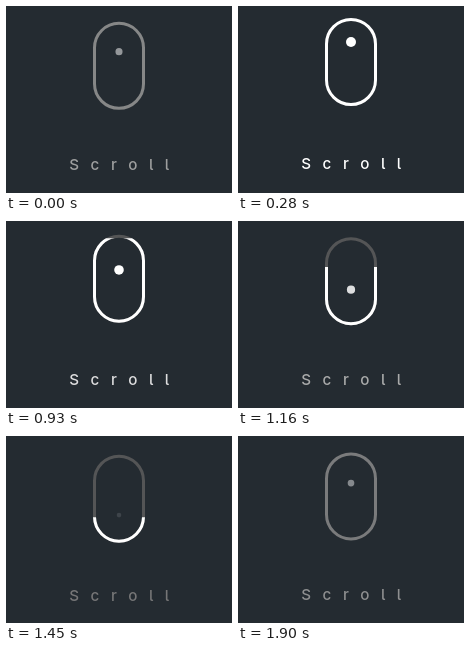
An HTML page for the animation above (2 s loop, 226x187 px).

```html
<!DOCTYPE html>
<html lang="en">
<head>
<meta charset="utf-8">
<title>Scroll hint</title>
<style>
  html, body { margin: 0; width: 100%; height: 100%; overflow: hidden; background: #242b31; }
  svg { display: block; width: 226px; height: 187px; }
  text { font: 500 15.2px Inter, Lato, sans-serif; letter-spacing: 11.6px; font-feature-settings: "cv05"; }
</style>
</head>
<body>
<svg viewBox="0 0 226 187">
  <defs>
    <clipPath id="fill"><rect id="level" x="80" width="66" height="120"/></clipPath>
    <rect id="pill" x="88.5" y="13.5" width="49" height="85" rx="24.5" fill="none" stroke-width="3"/>
  </defs>
  <g id="mouse">
    <use id="base" href="#pill"/>
    <g clip-path="url(#fill)"><use href="#pill" stroke="#fff"/></g>
    <circle id="ball" cx="113" r="5" fill="#fff"/>
  </g>
  <text id="label" x="63.2" y="163.2">Scroll</text>
</svg>
<script>
  const LOOP = 2000, START = 800, CYCLE = 1500;
  const $ = id => document.getElementById(id);
  const mouse = $('mouse'), base = $('base'), level = $('level'), ball = $('ball'), label = $('label');
  const GREY = [84, 85, 86], WHITE = [255, 255, 255];

  const linear = p => p;

  // cubic-bezier(0, 0, .58, 1)
  function easeOut(p) {
    let lo = 0, hi = 1;
    for (let i = 0; i < 24; i++) {
      const u = (lo + hi) / 2;
      if (1.74 * u * u * (1 - u) + u * u * u < p) lo = u; else hi = u;
    }
    return lo * lo * (3 - 2 * lo);
  }

  // Interpolates rows of [time, ...values], easing each segment.
  function track(keys, t, ease = linear) {
    if (t <= keys[0][0]) return keys[0].slice(1);
    for (let i = 1; i < keys.length; i++) {
      const a = keys[i - 1], b = keys[i];
      if (t < b[0]) {
        const p = ease((t - a[0]) / (b[0] - a[0]));
        return a.slice(1).map((v, k) => v + (b[k + 1] - v) * p);
      }
    }
    return keys[keys.length - 1].slice(1);
  }

  // Elapsed time to cycle time; the return lingers briefly midway.
  const PACE = [[0, 0], [1000, 1000], [1100, 1150], [1200, 1180], [1480, CYCLE]];
  const NUDGE = [[0, 0], [1000, 1], [1500, 0]];
  const BASE = [[1050, ...GREY], [1500, ...WHITE]];
  const TEXT = [[0, ...WHITE], [1050, ...GREY], [1500, ...WHITE]];
  // time, opacity, scale, offset
  const BALL = [
    [0, 1, 1, -20], [300, 1, .9, 5], [700, 0, .4, 40],
    [750, 0, .4, -20], [950, 0, .4, -20], [1400, 1, 1, -20]
  ];

  const rgb = c => `rgb(${c.map(Math.round)})`;

  function draw(ms) {
    const t = track(PACE, (ms - START + LOOP) % LOOP)[0];
    const nudge = track(NUDGE, t, easeOut)[0];
    const [alpha, scale, offset] = track(BALL, t);

    mouse.setAttribute('transform', `translate(0 ${8 * nudge})`);
    base.setAttribute('stroke', rgb(track(BASE, t)));
    level.setAttribute('y', .8 + .1135 * t);
    ball.setAttribute('cy', 56 + scale * offset);
    ball.setAttribute('r', 5 * scale);
    ball.setAttribute('opacity', alpha);
    label.setAttribute('transform', `translate(0 ${2 * nudge})`);
    label.setAttribute('fill', rgb(track(TEXT, t, easeOut)));
  }

  const begin = performance.now();
  function frame() {
    draw((performance.now() - begin) % LOOP);
    requestAnimationFrame(frame);
  }
  frame();
</script>
</body>
</html>
```
